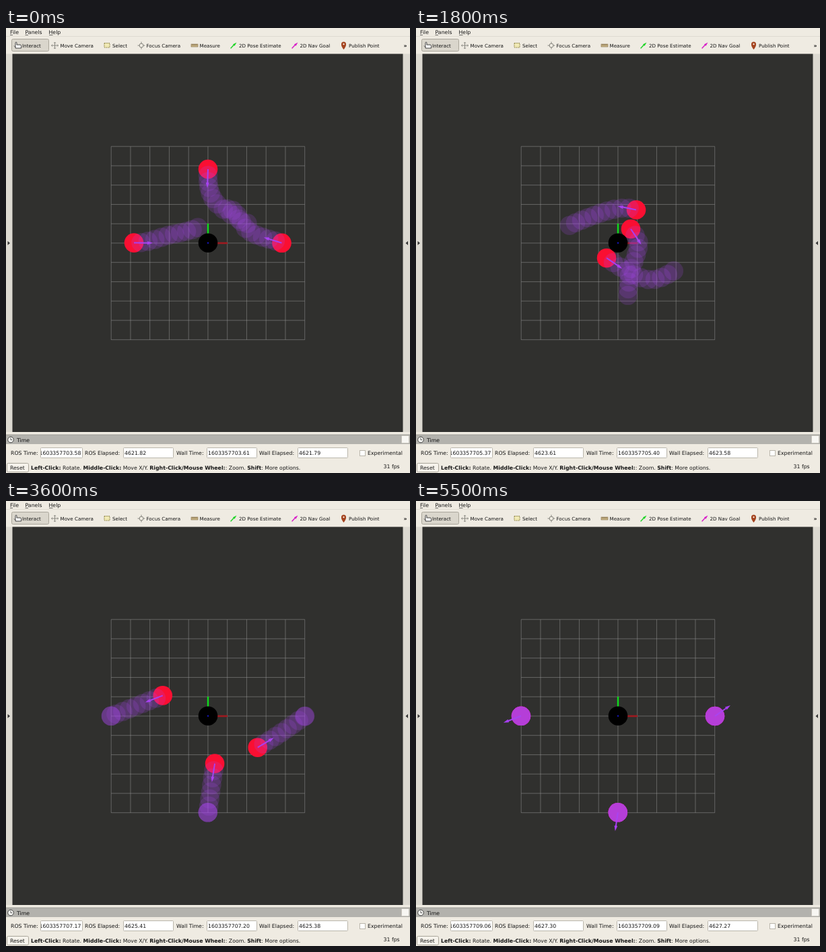
An HTML page that plays this animation: 600x662 px, repeating every 5.6 s.

```html
<!DOCTYPE html>
<html lang="en">
<head>
<meta charset="utf-8">
<title>Three agents crossing</title>
<style>
  html, body { margin: 0; width: 100%; height: 100%; overflow: hidden; background: #efebe2; }
  svg { display: block; width: 100vw; height: 100vh; }
  text { font: 7.8px "DejaVu Sans", sans-serif; fill: #151515; white-space: pre; }
  .tools text { font-size: 7.15px; }
  .bold { font-weight: bold; }
  .field { fill: #fff; stroke: #bab6ac; }
  .trail circle { fill: rgb(172,70,245); fill-opacity: .18; }
</style>
</head>
<body>
<svg viewBox="0 0 600 662">
  <rect width="600" height="662" fill="#efebe2"/>
  <path d="M0 12.5H600" stroke="#dfdbd1"/>
  <text x="6" y="9">File</text><text x="28.5" y="9">Panels</text><text x="63.5" y="9">Help</text>
  <path d="M6 10.5h4M28.500 10.500h4.500M64 10.500h5.500" stroke="#333" stroke-width=".7"/>

  <g class="tools">
    <rect x="8.5" y="16.5" width="55" height="18" rx="2" fill="#dad6cc" stroke="#aaa69b"/>
    <path d="M14 30V22.5q0-1.5 1-1.5t1 1.5V25h5q1.5 0 1.5 1.5V30ZM12 26.5l2 2" fill="#fff" stroke="#333" stroke-width=".9"/>
    <g fill="none" stroke="#8a8982">
      <path d="M72.5 21V31M67.5 26H77.5M71 22.5l1.5-1.5 1.5 1.5M71 29.5l1.5 1.5 1.5-1.5M69 24.5l-1.5 1.5 1.5 1.5M76 24.5l1.5 1.5-1.5 1.5"/>
      <circle cx="201" cy="26" r="3"/>
      <path d="M201 20.5V24M201 28V31.5M195.5 26H199M203 26H206.5"/>
    </g>
    <rect x="146" y="22.5" width="8" height="6.5" fill="#f0e9b4" stroke="#8f8548" stroke-dasharray="2 1"/>
    <rect x="275" y="24" width="10" height="4" fill="#c9b486" stroke="#806b48" stroke-width=".6"/>
    <path d="M277 24v2M279 24v2M281 24v2M283 24v2" stroke="#5f4d2d" stroke-width=".6"/>
    <path id="pointer" d="M333 30l4.5-5-.5-.8 5.500-2.700-3 5.200-.8-.6-4.500 4.700Z" fill="#1fd428"/>
    <path d="M424 30l4.500-5-.5-.8 5.500-2.700-3 5.200-.8-.6-4.500 4.700Z" fill="#d81cc8"/>
    <path d="M501.5 32q-4-5-3.500-8a3.500 3.500 0 0 1 7 0q.5 3-3.500 8Z" fill="#a4431f"/>
    <circle cx="501.5" cy="24" r="1.2" fill="#f3e4da"/>
    <text x="24" y="28.5">Interact</text>
    <text x="80.5" y="28.5">Move Camera</text>
    <text x="158" y="28.5">Select</text>
    <text x="208.5" y="28.5">Focus Camera</text>
    <text x="287.5" y="28.5">Measure</text>
    <text x="346" y="28.5">2D Pose Estimate</text>
    <text x="436.5" y="28.5">2D Nav Goal</text>
    <text x="509" y="28.5">Publish Point</text>
  </g>
  <text x="590.5" y="28.5" class="bold">»</text>

  <!-- 3D view -->
  <rect y="38.5" width="600" height="562.5" fill="#dcd9d1"/>
  <rect x="9.500" y="38.500" width="580" height="562.500" fill="#30302e"/>
  <path d="M2.500 317v6l3.500-3ZM597 317v6l-3.500-3Z" fill="#333"/>
  <path id="grid" fill="none" stroke="#a0a0a0" stroke-opacity=".47"/>
  <path d="M300 320H329" stroke="#a01a20" stroke-width="2.600"/>
  <g id="discs" fill="#fa0f32"></g>
  <g id="arrows" fill="#a63ff0"></g>
  <g id="trails"></g>
  <path d="M300 320V291" stroke="#0edc1c" stroke-width="2.400"/>
  <circle cx="300" cy="319.700" r="14.300"/>
  <circle cx="300" cy="319.700" r="1.200" fill="#1616b8"/>

  <!-- time panel -->
  <rect y="605" width="600" height="14" fill="#b3b2ad"/>
  <path d="M0 605H600" stroke="#8f8e89" stroke-width=".7"/>
  <circle cx="7" cy="612.500" r="4.300" fill="#f5f5f2" stroke="#333" stroke-width=".9"/>
  <path d="M7 609.800V612.700H9.300" fill="none" stroke="#333" stroke-width=".8"/>
  <text x="16" y="615.500">Time</text>
  <rect x="587.500" y="606.500" width="11" height="11" rx="1" fill="#f8f7f3" stroke="#c8c5bc"/>
  <g id="clocks"></g>
  <rect x="525.500" y="628.500" width="8" height="8" class="field"/>
  <text x="537" y="635">Experimental</text>
  <rect x="1.500" y="647.500" width="32" height="13" rx="2" fill="#f6f3ec" stroke="#aaa69b"/>
  <text x="6" y="657">Reset</text>
  <text x="37" y="656.500"><tspan class="bold">Left-Click:</tspan> Rotate. <tspan class="bold">Middle-Click:</tspan> Move X/Y. <tspan class="bold">Right-Click/Mouse Wheel:</tspan>: Zoom. <tspan class="bold">Shift</tspan>: More options.</text>
  <text x="560.500" y="655">31 fps</text>
  <clipPath id="clip"><rect x="52" y="625" width="456" height="15"/></clipPath>
</svg>
<script>
const LOOP = 5600, STEP = 100;
const HORIZON = 10, PLAN_STEP = 200, RADIUS = 14.3, LEAD = 250;
const byId = id => document.getElementById(id);

function add(parent, tag, attrs, text = "") {
  const node = document.createElementNS("http://www.w3.org/2000/svg", tag);
  set(node, attrs);
  node.textContent = text;
  parent.append(node);
  return node;
}
function set(node, attrs) {
  for (const name in attrs) node.setAttribute(name, attrs[name]);
}

const CELL = 28.75;
let gridPath = "";
for (let i = 0; i <= 10; i++) {
  gridPath += `M${156.2 + i * CELL} 176.300v287.500M156.200 ${176.2 + i * CELL}h287.500`;
}
byId("grid").setAttribute("d", gridPath);

// Smooth curve through [time, x, y] keys; rests on the last one
function along(keys, time) {
  const last = keys.length - 1, t = Math.min(time, keys[last][0]);
  let i = 0;
  while (i < last - 1 && t >= keys[i + 1][0]) i++;
  const span = keys[i + 1][0] - keys[i][0], u = (t - keys[i][0]) / span, v = 1 - u;
  return [1, 2].map(axis => {
    const slope = j => {
      const a = keys[Math.max(0, j - 1)], b = keys[Math.min(last, j + 1)];
      return (b[axis] - a[axis]) / (b[0] - a[0]) * span;
    };
    return keys[i][axis] * (1 + 2 * u) * v * v + slope(i) * u * v * v
      + keys[i + 1][axis] * u * u * (1 + 2 * v) - slope(i + 1) * u * u * v;
  });
}

// swerve: how far the first plan's end lies from the path driven; gone after settle ms
const agents = [
  { keys: [[0, 190, 319.6], [1100, 248, 323], [2600, 323, 367], [3200, 355, 374], [4100, 396, 353], [5220, 444, 320]],
    swerve: [-8, -52], settle: 1200 },
  { keys: [[0, 300, 210], [1100, 300, 263], [1800, 319, 299], [2200, 330, 318], [2600, 326, 338], [3200, 314, 369.6], [4980, 299.8, 463.3]],
    swerve: [33, -18], settle: 2000 },
  { keys: [[0, 409.5, 319.8], [1100, 356, 301], [1800, 327, 270.5], [2600, 283, 272.2], [5150, 156, 319.8]],
    swerve: [12, 1], settle: 2400 },
];
for (const agent of agents) {
  agent.arrival = agent.keys.at(-1)[0];
  agent.disc = add(byId("discs"), "circle", { r: RADIUS });
  agent.arrow = add(byId("arrows"), "path", { d: "M0-1H20V-2.400L28 0 20 2.400V1H0Z" });
  const group = add(byId("trails"), "g", { class: "trail" });
  agent.trail = Array.from({ length: HORIZON }, () => add(group, "circle", { r: RADIUS }));
}

function heading({ keys, arrival }, t) {
  const from = Math.min(t, arrival - LEAD);
  const [x, y] = along(keys, from), [nextX, nextY] = along(keys, from + LEAD);
  return Math.atan2(nextY - y, nextX - x) * 180 / Math.PI;
}

function drawAgent(agent, t) {
  const [x, y] = along(agent.keys, t);
  set(agent.disc, { cx: x, cy: y });
  set(agent.arrow, { transform: `translate(${x} ${y}) rotate(${heading(agent, t)})` });
  const doubt = Math.max(0, 1 - (t / agent.settle) ** 2);
  agent.trail.forEach((circle, i) => {
    const [px, py] = along(agent.keys, t + (i + 1) * PLAN_STEP);
    const bend = doubt * ((i + 1) / HORIZON) ** 2;
    set(circle, { cx: px + agent.swerve[0] * bend, cy: py + agent.swerve[1] * bend });
  });
}

// Clocks; the first value is cut off by its narrow field
const clocks = [
  { name: "ROS Time:", labelX: 7, x: 51, width: 62, inset: -1.5, base: 1603357703.58 },
  { name: "ROS Elapsed:", labelX: 117, x: 174, width: 74, inset: 2, base: 4621.82 },
  { name: "Wall Time:", labelX: 253, x: 298, width: 74, inset: 2, base: 1603357703.61 },
  { name: "Wall Elapsed:", labelX: 376, x: 433, width: 74, inset: 2, base: 4621.79 },
];
for (const clock of clocks) {
  const panel = byId("clocks");
  add(panel, "text", { x: clock.labelX, y: 635 }, clock.name);
  add(panel, "rect", { x: clock.x + .5, y: 624.5, width: clock.width, height: 15, rx: 1, class: "field" });
  const cut = add(panel, "g", { "clip-path": "url(#clip)" });
  clock.value = add(cut, "text", { x: clock.x + clock.inset, y: 635 });
}

function draw(t) {
  for (const agent of agents) drawAgent(agent, t);
  for (const { value, base } of clocks) value.textContent = (base + t * .000996).toFixed(2);
}

const start = performance.now();
function tick() {
  const t = (performance.now() - start) % LOOP;
  draw(Math.floor(t / STEP) * STEP);
  requestAnimationFrame(tick);
}
tick();
</script>
</body>
</html>
```
